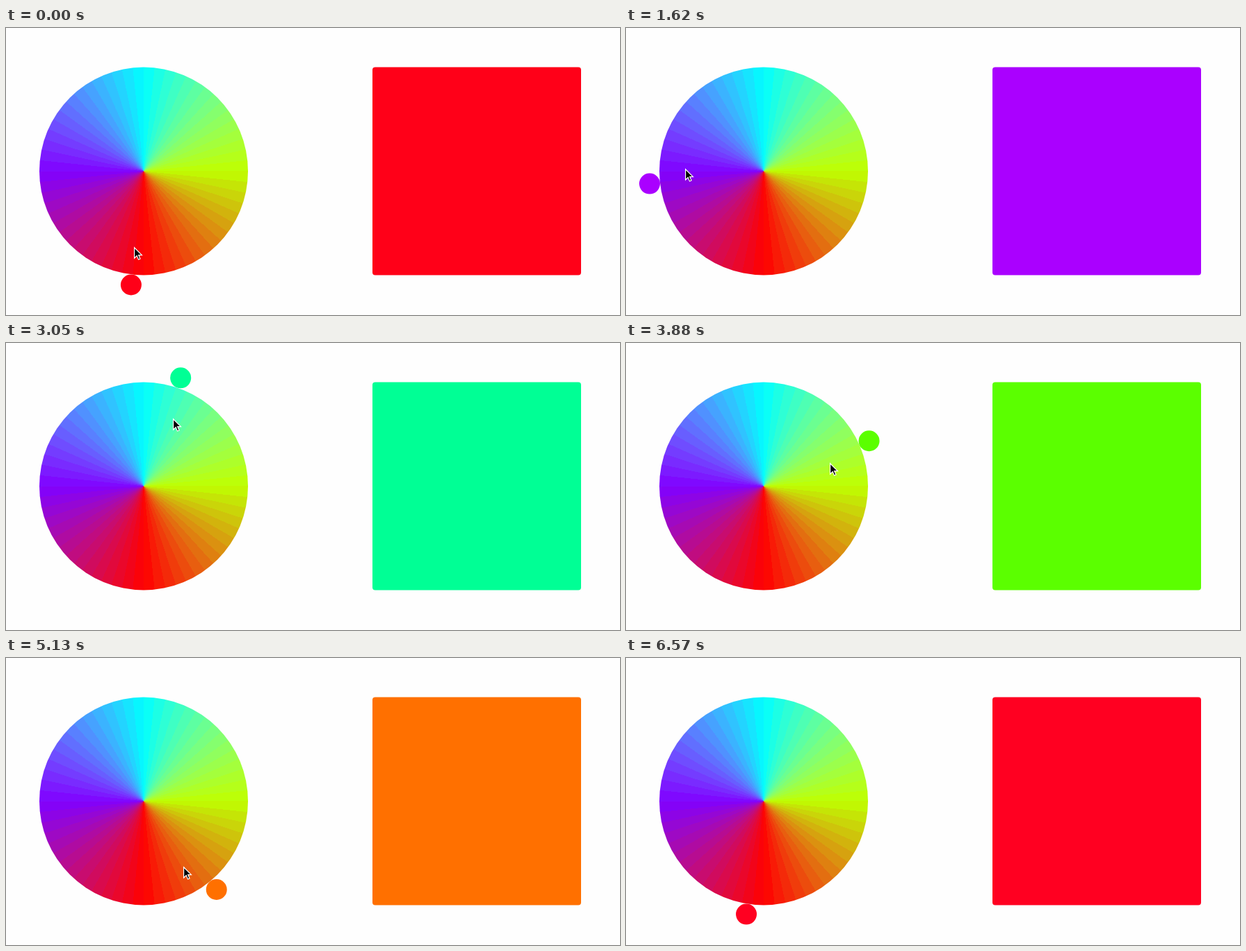
Animation, 883 px wide and 414 px high, one loop 7.83 s. Source, as an HTML page with a canvas:

```html
<!DOCTYPE html>
<html lang="en">
<head>
<meta charset="utf-8">
<title>Colour wheel</title>
<style>
  html, body { margin: 0; width: 100%; height: 100%; overflow: hidden; background: #fefefe; }
  canvas { display: block; }
</style>
</head>
<body>
<canvas id="stage" width="883" height="414"></canvas>
<script>
const LOOP = 7830, POINTER_GONE = 6570, STEP = 125;
const CX = 198, CY = 206.5, RADIUS = 150, ORBIT = 165, FACET = 6;
const ctx = document.getElementById('stage').getContext('2d');
const mix = (a, b, k) => a + (b - a) * k;

// Angles run clockwise from the bottom of the wheel, in degrees.
function polar(angle, r) {
  const a = angle * Math.PI / 180;
  return [CX - r * Math.sin(a), CY + r * Math.cos(a)];
}

// One colour per quarter turn; the weakest channel swells between them.
const corners = [[255, 0, 0], [128, 0, 255], [0, 255, 255], [191, 255, 0], [255, 0, 0]];
const weakest = [1, 0, 0, 2];
const swell = [12, 25, 25, 16];

function wheelColour(angle) {
  const q = Math.floor(angle / 90), k = angle / 90 - q;
  const rgb = corners[q].map((c, i) => mix(c, corners[q + 1][i], k));
  rgb[weakest[q]] += swell[q] * 4 * k * (1 - k);
  return `rgb(${rgb.map(Math.round)})`;
}

const wheelFill = ctx.createConicGradient(Math.PI / 2, CX, CY);
for (let a = 0; a < 360; a += FACET) {
  const colour = wheelColour(a + FACET / 2);
  wheelFill.addColorStop(a / 360, colour);
  wheelFill.addColorStop((a + FACET) / 360, colour);
}

// Dot angle and the hue picked there.
const hues = [[0, 360], [37.1, 327], [143.4, 220], [198.8, 155], [291.3, 46], [349.9, 6.8], [360, 0]];

function hueAt(angle) {
  const a = angle % 360;
  const i = hues.findIndex(h => h[0] > a);
  const [a0, h0] = hues[i - 1], [a1, h1] = hues[i];
  return mix(h0, h1, (a - a0) / (a1 - a0));
}

// Time, dot angle, how far the pointer leads the dot, pointer distance from the centre.
const keys = [
  [55, 6.3, 1, 110], [940, 37.1, 9.8, 108], [1620, 83.7, 8, 113], [2330, 143.4, 4.6, 123],
  [2530, 150.8, 4.6, 115], [3050, 198.8, 4.6, 106], [3200, 200.2, 4.6, 103], [3980, 256, 4, 100],
  [4540, 291.3, 8, 104], [5580, 349.9, 8.6, 116], [6130, 368.7, 9.3, 134], [6570, 368.7, -23.9, 167]
];

// The drag advances in jumps: each stretch is cut into equal steps near STEP long.
function poseAt(t) {
  const i = keys.findIndex(k => k[0] > t);
  if (i < 0) return keys[keys.length - 1].slice(1);
  if (i === 0) return keys[0].slice(1);
  const from = keys[i - 1], to = keys[i], span = to[0] - from[0];
  const steps = Math.round(span / STEP);
  const k = Math.floor((t - from[0]) / span * steps) / steps;
  return from.slice(1).map((v, n) => mix(v, to[n + 1], k));
}

function disc(x, y, r, fill) {
  ctx.fillStyle = fill;
  ctx.beginPath();
  ctx.arc(x, y, r, 0, 2 * Math.PI);
  ctx.fill();
}

const arrow = new Path2D('M.6 .8V16L4.2 12.6L6.5 18L9 16.9L6.7 11.6H11.4Z');

function drawPointer(x, y) {
  ctx.save();
  ctx.translate(Math.round(x), Math.round(y));
  ctx.fillStyle = '#000';
  ctx.strokeStyle = '#fff';
  ctx.lineWidth = 1.2;
  ctx.fill(arrow);
  ctx.stroke(arrow);
  ctx.restore();
}

function draw(t) {
  const [angle, lead, reach] = poseAt(t);
  const colour = `hsl(${hueAt(angle)}, 100%, 50%)`;
  ctx.fillStyle = '#fefefe';
  ctx.fillRect(0, 0, 883, 414);
  disc(CX, CY, RADIUS, wheelFill);
  disc(...polar(angle, ORBIT), 15, colour);
  ctx.beginPath();
  ctx.roundRect(527, CY - RADIUS, 2 * RADIUS, 2 * RADIUS, 4);
  ctx.fill();
  if (t < POINTER_GONE) drawPointer(...polar(angle + lead, reach));
}

const start = performance.now();
(function tick() {
  draw((performance.now() - start) % LOOP);
  requestAnimationFrame(tick);
})();
</script>
</body>
</html>
```
